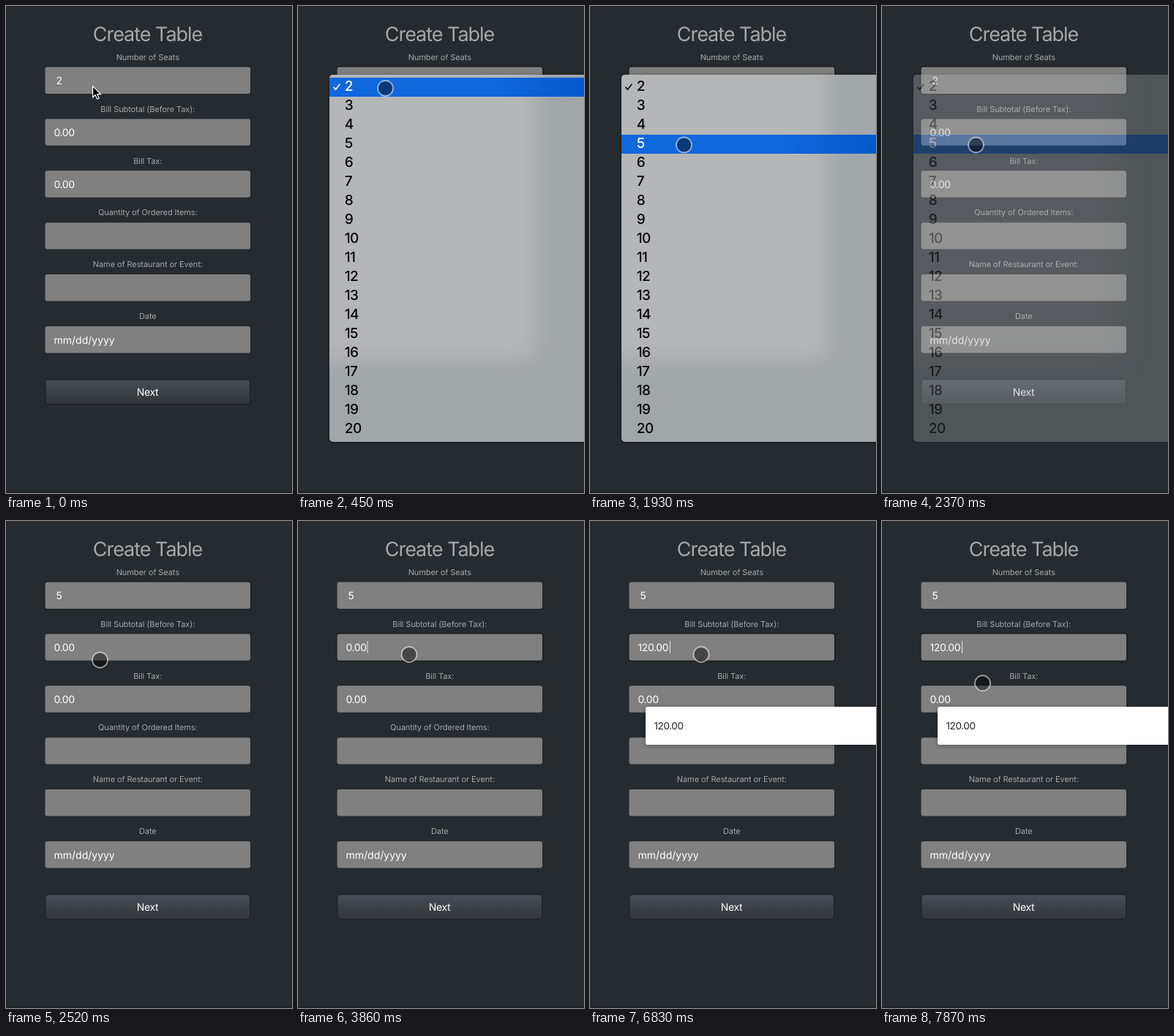
These frames come from a looping animation (391 by 666 pixels, 8 s). An HTML page:

```html
<!DOCTYPE html>
<html lang="en">
<head>
<meta charset="utf-8">
<title>Create Table</title>
<style>
  html, body { margin: 0; height: 100%; overflow: hidden; background: #262b2f; }
  svg { display: block; }
  text {
    font: 14px Inter, Roboto, sans-serif;
    letter-spacing: -.4px;
    fill: #fff;
    text-rendering: geometricPrecision;
    white-space: pre;
  }
  text.title { font-size: 27px; letter-spacing: -1.05px; fill: #a6a7a8; }
  text.label { font-size: 11px; letter-spacing: -.09px; fill: #a4a6a7; }
  text.date { letter-spacing: 0; }
  text.item { font-size: 19px; font-weight: 500; letter-spacing: -.6px; fill: #050505; }
  text.hint { font-size: 13.5px; fill: #222; }
  .mid { text-anchor: middle; }
</style>
</head>
<body>
<svg width="391" height="666" viewBox="0 0 391 666">
  <defs>
    <linearGradient id="btn" x2="0" y2="1">
      <stop stop-color="#484e55"/>
      <stop offset=".6" stop-color="#3a3f44"/>
      <stop offset="1" stop-color="#313539"/>
    </linearGradient>
    <linearGradient id="blue">
      <stop offset=".6" stop-color="#1068dd"/>
      <stop offset="1" stop-color="#0559cb"/>
    </linearGradient>
    <filter id="soft" x="-20%" y="-20%" width="140%" height="140%">
      <feGaussianBlur stdDeviation="15"/>
    </filter>
    <filter id="shade" x="-20%" y="-20%" width="140%" height="140%">
      <feDropShadow dx="0" dy="1" stdDeviation="3" flood-opacity=".35"/>
    </filter>
    <clipPath id="panel"><rect x="43" y="94" width="380" height="502" rx="5"/></clipPath>
  </defs>

  <rect width="391" height="666" fill="#262b2f"/>
  <rect width="391" height="4" fill="#2a2a2b"/>
  <rect y="664" width="391" height="2" fill="#1f2325"/>
  <text class="title mid" x="193.5" y="48">Create Table</text>
  <g id="form"></g>
  <rect id="ring" x="52.5" width="282.5" height="38.4" rx="4" fill="none" stroke="#000" stroke-opacity=".22" stroke-width="2"/>
  <rect x="54" y="511" width="279.5" height="33.5" rx="3" fill="url(#btn)" stroke="#1b1e20"/>
  <text class="mid" x="193.5" y="532.6">Next</text>
  <rect id="caret" y="164" width="1" height="17" fill="#e4e4e4"/>

  <g id="hint">
    <rect x="76" y="254" width="340" height="52" rx="3" fill="#fff" filter="url(#shade)"/>
    <text class="hint" x="87.5" y="285">120.00</text>
  </g>

  <g id="menu">
    <rect x="43" y="94" width="380" height="502" rx="5" fill="#a1a6a9" filter="url(#shade)"/>
    <g clip-path="url(#panel)">
      <rect x="-20" y="60" width="346" height="424" fill="#b5b6b8" filter="url(#soft)"/>
      <rect id="bar" x="43" width="348" height="26" fill="url(#blue)"/>
    </g>
    <path id="tick" d="M48.5 110.8l3 3.4 5.8-7.4" fill="none" stroke-width="1.8"/>
  </g>

  <path id="arrow" d="M118.6 109.6v15.2l3.5-3.2 2.5 5.7 2.6-1.1-2.5-5.6h4.7z" fill="#000" stroke="#fff" stroke-width="1.2"/>
  <circle id="dot" r="10.5" fill="#000" fill-opacity=".45" stroke="#fff" stroke-opacity=".55" stroke-width="1.8"/>
</svg>
<script>
const $ = id => document.getElementById(id);

function add(parent, tag, attrs, text = '') {
  const el = document.createElementNS('http://www.w3.org/2000/svg', tag);
  for (const k in attrs) el.setAttribute(k, attrs[k]);
  el.textContent = text;
  return parent.appendChild(el);
}

const show = (el, on) => el.setAttribute('visibility', on ? 'visible' : 'hidden');

const fields = [
  ['Number of Seats', '2', 68.5],
  ['Bill Subtotal (Before Tax):', '0.00', 65.5],
  ['Bill Tax:', '0.00', 65.5],
  ['Quantity of Ordered Items:', '', 65.5],
  ['Name of Restaurant or Event:', '', 65.5],
  ['Date', 'mm/dd/yyyy', 65.5, 'date'],
];
const pitch = 70.9, rowH = 26, rowTop = 98;

const values = fields.map(([label, value, x, cls = ''], i) => {
  const y = pitch * i;
  add($('form'), 'text', { class: 'label mid', x: 193.8, y: y + 73.7 }, label);
  add($('form'), 'rect', { x: 53.5, y: y + 83.5, width: 280.5, height: 36.4, rx: 3, fill: '#808080' });
  return add($('form'), 'text', { class: cls, x, y: y + 107.4 }, value);
});

const items = Array.from({ length: 19 }, (_, i) =>
  add($('menu'), 'text', { class: 'item', x: 63.8, y: rowTop + 18 + rowH * i }, i + 2));

// Pointer moves: start time, number of steps, from, to
const stepMs = 146;
const moves = [
  [1200, 6, [119.5, 112.5], [128.5, 190]],
  [3270, 3, [128.5, 190], [152, 182.5]],
  [7580, 3, [152, 182.5], [132.5, 235.5]],
];

// Key presses: time, field content, caret position
const keys = [
  [3860, '0.00', 94.5],
  [4750, '0.01', 92.5],
  [5050, '0.12', 92.5],
  [5640, '1.20', 92.5],
  [6240, '12.00', 101],
  [6830, '120.00', 109],
];

function pointer(t) {
  const [start, steps, a, b] = moves.findLast(m => t >= m[0]) || moves[0];
  const n = Math.floor((t - start) / stepMs) + 1;
  const p = Math.min(1, Math.max(0, n / steps));
  const e = p * p * (3 - 2 * p);
  return a.map((v, i) => v + (b[i] - v) * e);
}

function draw(t) {
  const [x, y] = pointer(t);
  $('dot').setAttribute('cx', x);
  $('dot').setAttribute('cy', y);
  show($('dot'), t >= 450);
  show($('arrow'), t < 450);

  const open = t >= 450 && t < 2520;
  show($('menu'), open);
  if (open) {
    const row = Math.floor((y - rowTop) / rowH);
    $('menu').setAttribute('opacity', t < 2370 ? 1 : .34);
    $('bar').setAttribute('y', rowTop + rowH * row);
    items.forEach((el, i) => el.style.fill = i === row ? '#fff' : '');
    $('tick').setAttribute('stroke', row === 0 ? '#fff' : '#111');
  }

  const key = keys.findLast(k => t >= k[0]);
  values[0].textContent = t < 2520 ? '2' : '5';
  values[1].textContent = key ? key[1] : '0.00';
  show($('caret'), key && (t - key[0]) % 900 < 440);
  if (key) $('caret').setAttribute('x', key[2]);
  show($('ring'), t >= 450);
  $('ring').setAttribute('y', 82.5 + (key ? pitch : 0));
  show($('hint'), t >= 6830);
}

function loop() {
  draw(performance.now() % 8000);
  requestAnimationFrame(loop);
}
loop();
</script>
</body>
</html>
```
